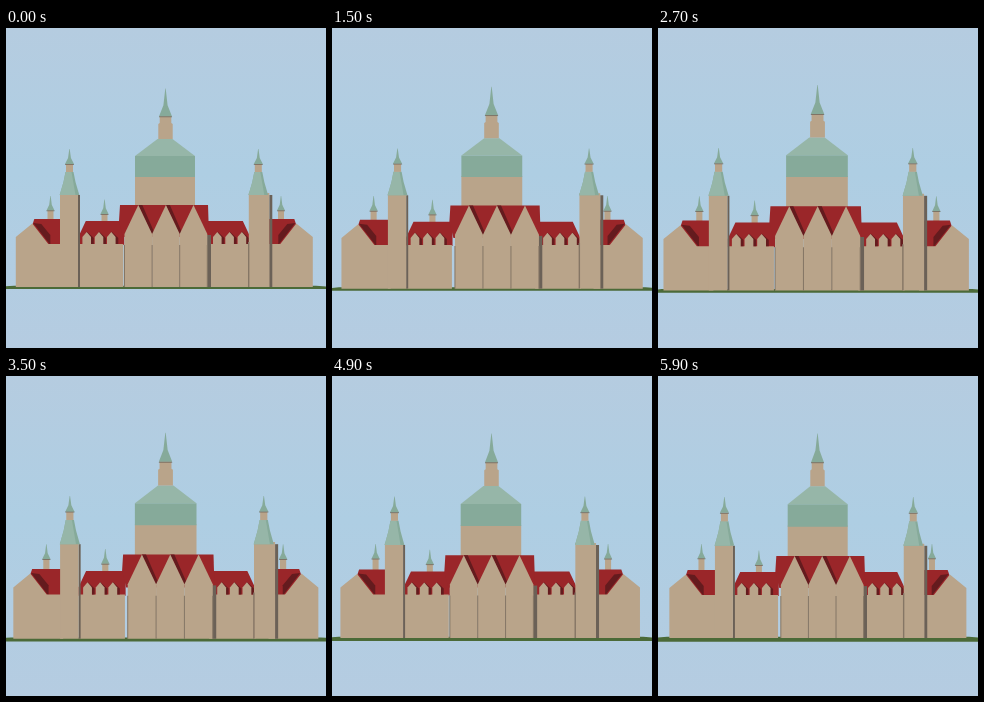
Write an HTML page with a canvas that moves like this. It is 320 px wide and 320 px high and loops after 6 s.

```html
<!DOCTYPE html>
<html lang="en">
<head>
<meta charset="utf-8">
<style>
html, body { margin: 0; width: 100%; height: 100%; overflow: hidden; background: #b0cce2; }
canvas { display: block; width: 320px; height: 320px; }
</style>
</head>
<body>
<canvas id="stage" width="320" height="320"></canvas>
<script>
const ctx = document.getElementById('stage').getContext('2d');
const LOOP = 6000, STEP = 100, AXIS = 158.3;
const BASE = 259, EAVES = 216;
const WALL = '#b9a48a', SHADE = '#6b6157', SEAM = '#857665';
const RED = '#9a2629', DARK_RED = '#641b1e';
const TEAL = '#96b6a8', TEAL_DARK = '#86aa9a', GREEN = '#4b6a38';

const clamp = (v, lo, hi) => Math.min(hi, Math.max(lo, v));
const swing = t => -2.2 * Math.cos(2 * Math.PI * (t - 200) / 2400);
let cam;

function aim(t) {
  cam = {
    zoom: 1 + 0.0145 * (1 - Math.cos(2 * Math.PI * t / LOOP)),
    yaw: swing(t) - swing(0),
    rise: 3.2 * (t / LOOP) ** 2
  };
}

// Depth is positive toward the viewer and controls the parallax.
function project(x, y, depth) {
  const tilt = depth < 0 ? 0 : clamp((y - 122) / 50, -1, 1);
  return [
    159 + (x - 159) * cam.zoom + cam.yaw * depth,
    160 + (y - 160) * cam.zoom + cam.rise * tilt
  ];
}

function poly(color, depth, ...points) {
  ctx.beginPath();
  for (const [x, y] of points) ctx.lineTo(...project(x, y, depth));
  ctx.closePath();
  ctx.fillStyle = color;
  ctx.fill();
}

// Points are given as distances from the axis; side is -1 or 1.
function wingPoly(side, color, depth, ...points) {
  poly(color, depth, ...points.map(([d, y]) => [AXIS + side * d, y]));
}

// Upright symmetric shape from rows of [half width, y], top to bottom.
function lathe(color, depth, x, ...rows) {
  const left = rows.map(([half, y]) => [x - half, y]);
  const right = rows.map(([half, y]) => [x + half, y]).reverse();
  poly(color, depth, ...left, ...right);
}

function box(color, depth, x0, y0, x1, y1) {
  poly(color, depth, [x0, y0], [x1, y0], [x1, y1], [x0, y1]);
}

function sky() {
  const g = ctx.createLinearGradient(0, 0, 0, 320);
  g.addColorStop(0, '#b5cce0');
  g.addColorStop(0.45, '#aecee3');
  g.addColorStop(1, '#b5cce1');
  ctx.fillStyle = g;
  ctx.fillRect(0, 0, 320, 320);
}

function ground() {
  const near = 261 + 0.5 * cam.rise;
  lathe(GREEN, 0.3, 159, [151, 257.7], [167, 259], [167, near]);
}

function spire(x, base, tip, half, depth) {
  const neck = base - (base - tip) * 0.4;
  lathe(TEAL_DARK, depth, x, [0.2, tip], [half * 0.32, neck], [half, base]);
  box(SHADE, depth, x - half, base, x + half, base + 0.7);
}

function turret(x, tip, depth) {
  box(WALL, depth, x - 3, tip + 14, x + 3, tip + 27);
  spire(x, tip + 14.5, tip, 4, depth);
}

function dome() {
  lathe(WALL, 0.2, 159, [30, 148], [30, 180]);
  lathe(TEAL_DARK, 0.2, 159, [30, 128], [30, 149]);
  lathe(TEAL, 0.2, 159, [7.5, 111], [30, 128]);
  lathe(WALL, 0, 159.5, [5.8, 88], [5.8, 95], [7.2, 96], [7.2, 111]);
  spire(159.5, 88.5, 60.5, 6.5, 0);
}

function outerWing(side) {
  wingPoly(side, RED, 0.4, [100, 191], [130, 191], [132, 197], [116, 218], [100, 218]);
  wingPoly(side, DARK_RED, 0.4, [131, 195], [123, 196], [114, 207], [114, 217]);
  wingPoly(side, WALL, 0.45, [148.5, BASE], [148.5, 209], [132, 195.5], [116, EAVES],
    [100, EAVES], [100, BASE]);
}

function innerWing(side) {
  wingPoly(side, RED, 0.7, [40, 193], [78.5, 193], [86, 209], [86, 217], [40, 217]);
  wingPoly(side, WALL, 0.8, [41, EAVES], [86, EAVES], [86, BASE], [41, BASE]);
  for (let i = 0; i < 3; i++) {
    const x = AXIS + side * (53 + 12.3 * i);
    poly(DARK_RED, 0.8, [x, 203.5], [x + 7, 210], [x + 7, EAVES], [x, EAVES]);
    lathe(WALL, 0.85, x, [0, 204], [4.3, 209], [4.3, 217]);
  }
}

function tower(x, wallEnd, shade) {
  box(SHADE, 0.85, x + wallEnd, 167, x + wallEnd + shade, BASE);
  box(WALL, 0.85, x - 9.5, 165, x + wallEnd, BASE);
  lathe(TEAL_DARK, 0.85, x, [4, 144], [6, 154], [9.8, 167]);
  poly(TEAL, 0.85, [x - 4, 144], [x + 2, 144], [x + 6, 167], [x - 9.8, 167], [x - 6, 154]);
  box(WALL, 0.85, x - 3.5, 136, x + 3.5, 144);
  spire(x, 136, 121, 4.5, 0.85);
}

function centralBlock() {
  const left = 118.5, pitch = 27.6, depth = 1.25;
  poly(RED, depth, [114, 177], [202, 177], [203, 209], [117, 209], [113, 193]);
  box(SHADE, 1.15, 201, 207, 205, BASE);
  for (let i = 0; i < 3; i++) {
    const x = left + pitch * i, peak = x + pitch / 2, end = x + pitch;
    if (i < 2) poly(DARK_RED, depth, [peak, 177], [peak + 4, 177], [end + 2, 204], [end, 207]);
    lathe(WALL, depth, peak, [0, 177], [pitch / 2, 206], [pitch / 2, BASE]);
  }
  for (let i = 0; i < 4; i++) {
    const x = left + pitch * i;
    box(SEAM, depth, x - 0.5, 217, x + 0.5, BASE);
  }
}

function draw(t) {
  aim(t);
  sky();
  ground();
  dome();
  turret(44.5, 168, -0.3);
  turret(275, 168, -0.3);
  for (const side of [-1, 1]) outerWing(side);
  turret(98.5, 171.5, 0.7);
  for (const side of [-1, 1]) innerWing(side);
  tower(63.5, 8.5, 2);
  tower(252.3, 11, 3);
  box(SEAM, 0.85, 242, 214, 243.4, BASE);
  centralBlock();
}

function tick() {
  const t = performance.now() % LOOP;
  draw(Math.floor(t / STEP) * STEP);
  requestAnimationFrame(tick);
}
tick();
</script>
</body>
</html>
```
